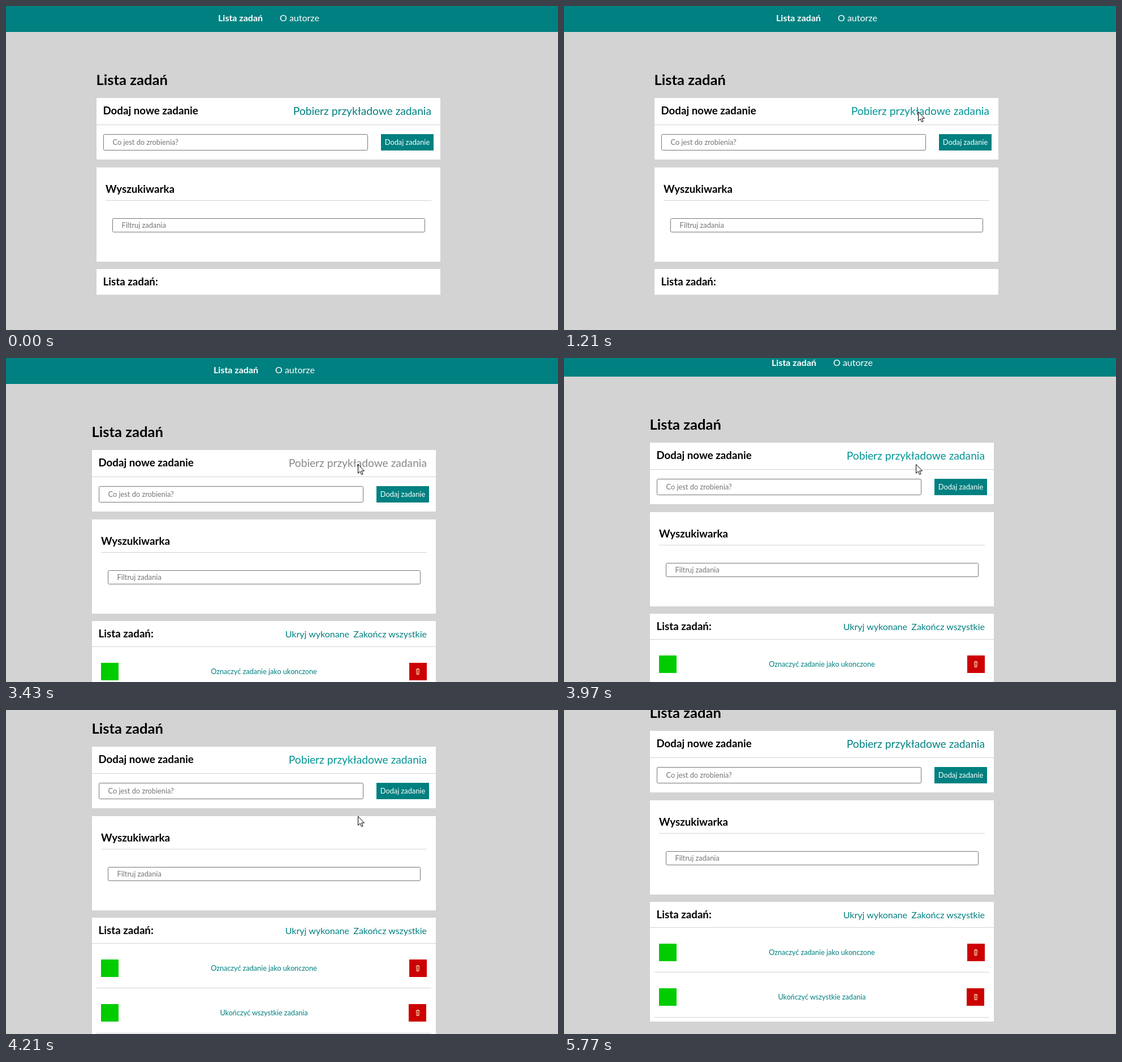
An HTML page for the animation above (6400 ms loop, 976 by 574 pixels).

```html
<!DOCTYPE html>
<html lang="pl">
<head>
<meta charset="utf-8">
<title>Lista zadań</title>
<style>
  html, body { margin: 0; width: 100%; height: 100%; overflow: hidden; background: #d3d3d3; }
  svg { display: block; width: 976px; height: 574px; }
  text { font-family: Lato, sans-serif; font-size: 16px; white-space: pre; }
  .end { text-anchor: end; }
  .mid { text-anchor: middle; }
  .bold { font-weight: 700; }
  .h1 { font-size: 25.6px; }
  .h2 { font-size: 18.72px; }
  .link { font-size: 19.2px; }
  .small { font-size: 12.8px; }
  .task { font-size: 12.65px; }
  .hint { fill: #757575; }
  .white, .card { fill: #fff; }
  .teal { fill: #008080; }
  .line { fill: #d3d3d3; }
  .done { fill: #0c0; }
  .remove { fill: #c00; }
  .input { fill: #fff; stroke: #767676; }
  .bin { fill: none; stroke: #f6dfb4; stroke-width: 1; }
</style>
</head>
<body>
<svg viewBox="0 0 976 574">
  <defs>
    <path id="bin" class="bin" d="M-3 -4.5H3M-2.5 -4.5L-2 4.5H2L2.5 -4.5M0 -3V4M-1 -5.5H1.5"/>
  </defs>
  <g id="page">
    <rect class="teal" width="976" height="46"/>
    <g id="content">
      <text class="white bold" x="375" y="27">Lista zadań</text>
      <text class="white" x="484" y="27">O autorze</text>
      <text class="bold h1" x="159.5" y="140">Lista zadań</text>

      <rect class="card" x="160" y="163" width="608" height="109"/>
      <rect class="line" x="160" y="210" width="608" height="1"/>
      <text class="bold h2" x="171.5" y="192">Dodaj nowe zadanie</text>
      <g id="link">
        <text id="fetch" class="link end" x="752" y="193">Pobierz przykładowe zadania</text>
        <text id="loading" class="link end" x="752" y="193">Ładowanie zadań</text>
      </g>
      <rect class="input" x="172.5" y="227.5" width="467" height="28" rx="2"/>
      <text class="small hint" x="188.5" y="246">Co jest do zrobienia?</text>
      <rect class="teal" x="663" y="227" width="93" height="29"/>
      <text class="small white mid" x="709.5" y="246">Dodaj zadanie</text>

      <rect class="card" x="160" y="286" width="608" height="167"/>
      <text class="bold h2" x="176" y="331">Wyszukiwarka</text>
      <rect class="line" x="176" y="344" width="576" height="1"/>
      <rect class="input" x="188.5" y="376.5" width="552" height="24" rx="2"/>
      <text class="small hint" x="204.5" y="393">Filtruj zadania</text>

      <rect class="card" x="160" y="466" width="608" height="45.5"/>
      <g id="list">
        <rect class="card" x="160" y="511" width="608" height="167"/>
        <rect class="line" x="160" y="511" width="608" height="1"/>
        <text class="teal end" x="615" y="495">Ukryj wykonane</text>
        <text class="teal end" x="752" y="495">Zakończ wszystkie</text>

        <rect class="done" x="176" y="540" width="31" height="31"/>
        <text class="teal task mid" x="464" y="560">Oznaczyć zadanie jako ukonczone</text>
        <rect class="remove" x="721" y="540" width="31" height="31"/>
        <use href="#bin" x="736" y="556"/>
        <rect class="line" x="168" y="590" width="592" height="1"/>

        <rect class="done" x="176" y="619" width="31" height="31"/>
        <text class="teal task mid" x="464" y="639">Ukończyć wszystkie zadania</text>
        <rect class="remove" x="720" y="619" width="31" height="31"/>
        <use href="#bin" x="736" y="635"/>
        <rect class="line" x="168" y="670" width="592" height="1"/>
      </g>
      <text class="bold h2" x="171.5" y="495">Lista zadań:</text>
    </g>
  </g>
  <path id="cursor" fill="#fff" stroke="#000" stroke-linejoin="round"
        d="M.5 .5V16.3L4.1 12.9L6.6 18.5L9 17.5L6.6 12H11.5Z"/>
</svg>
<script>
const LOOP = 6400;

// Keys are [ms, value]; the last value stays until the loop ends.
function play(id, prop, keys, easing = 'step-end') {
  const frames = [...keys, [LOOP, keys[keys.length - 1][1]]]
    .map(([t, value]) => ({ offset: t / LOOP, [prop]: value, easing }));
  document.getElementById(id).animate(frames, { duration: LOOP, iterations: Infinity });
}

const move = (x, y) => `translate(${x}px, ${y}px)`;
const moves = points => points.map(([t, x, y]) => [t, move(x, y)]);

play('cursor', 'transform', moves([
  [0, -50, 0], [70, 862, 522], [150, 852, 470], [220, 844, 427],
  [370, 824, 390], [450, 800, 350], [530, 772, 312], [600, 745, 278],
  [680, 720, 252], [750, 698, 232], [830, 678, 216], [910, 662, 205],
  [980, 650, 202], [1060, 638, 194], [1130, 631, 189], [1210, 626, 187],
  [1360, 622, 187], [1520, 622, 188],
  [4780, 630, 202], [4860, 645, 237], [4930, 690, 310], [5010, 770, 410],
  [5080, 896, 555], [5160, -50, 0]
]));

play('page', 'transform', moves([
  [0, 0, 0], [3900, 0, -3], [3970, 0, -13], [4060, 0, -42],
  [4140, 0, -72], [4210, 0, -98], [4290, 0, -117], [4370, 0, -126]
]));

// The scrollbar narrows the page once the list has loaded.
play('content', 'transform', moves([[0, 0, 0], [3430, -8, 0]]));
play('list', 'visibility', [[0, 'hidden'], [3430, 'visible']]);
play('fetch', 'visibility', [[0, 'visible'], [2290, 'hidden'], [3430, 'visible']]);
play('loading', 'visibility', [[0, 'hidden'], [2290, 'visible'], [3430, 'hidden']]);

const idle = 'rgb(0, 128, 128)', hover = 'rgb(0, 148, 148)', busy = 'rgb(136, 136, 136)';
play('link', 'fill', [
  [0, idle], [910, idle], [1210, hover], [2250, hover],
  [2740, busy], [3450, busy], [3740, hover], [4780, hover], [5160, idle]
], 'linear');
</script>
</body>
</html>
```
